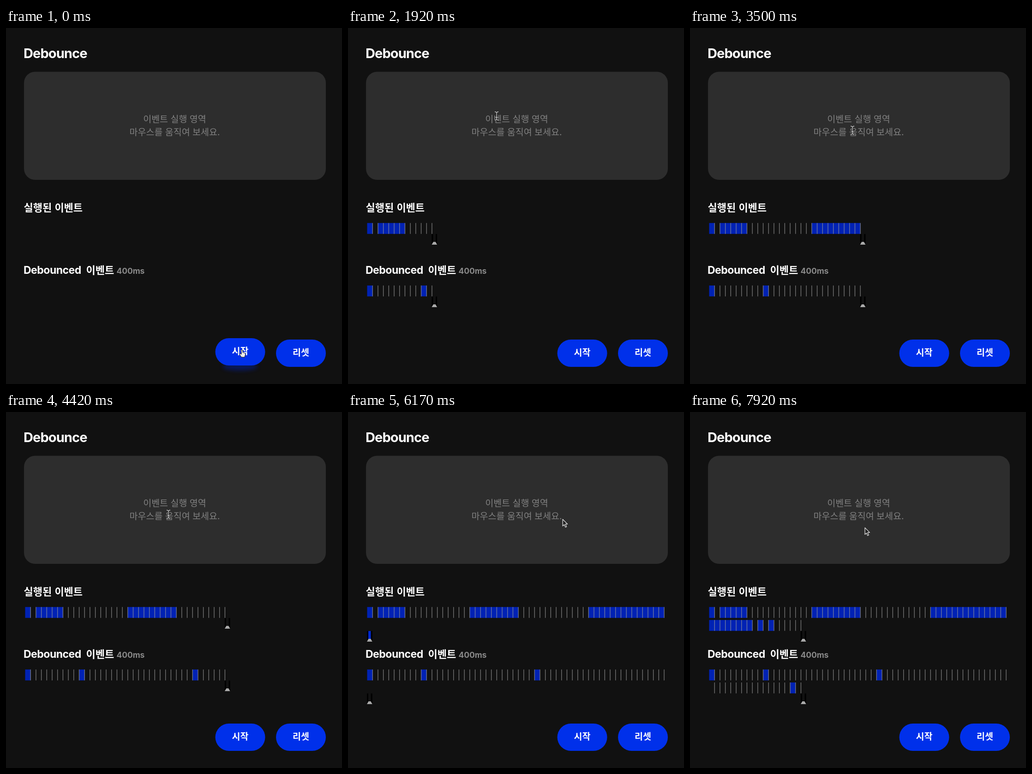
Write an HTML page that moves like this. It is 728x769 px and loops after 8000 ms.

```html
<!DOCTYPE html>
<html lang="ko">
<head>
<meta charset="utf-8">
<title>Debounce</title>
<style>
  html, body { margin: 0; width: 100%; height: 100%; overflow: hidden; background: #111; }
  svg { display: block; width: 728px; height: 769px; }
  text { font-family: Inter, "Noto Sans CJK KR", "Noto Sans CJK", sans-serif; font-weight: 700; fill: #fff; }
  .ko { font-family: "Noto Sans CJK KR", "Noto Sans CJK", sans-serif; font-size: 22px; }
  .hint { font-size: 19.5px; font-weight: 500; fill: #808080; text-anchor: middle; }
  .delay { font-size: 17.5px; letter-spacing: -.1px; fill: #888; }
  .button rect { fill: #0030ea; }
  .button text { font-size: 19.5px; text-anchor: middle; }
  .cells { fill: #0022b4; }
  .lines { fill: none; stroke: #999; stroke-opacity: .78; stroke-width: 1.3; }
</style>
</head>
<body>
<svg viewBox="0 0 728 769">
  <defs>
    <filter id="blur" x="-50%" y="-100%" width="200%" height="300%"><feGaussianBlur stdDeviation="4"/></filter>
    <path id="beamShape" d="M-4-9Q0-9 0-6Q0-9 4-9M0-6V6M-4 9Q0 9 0 6Q0 9 4 9M-2 3H2" fill="none"/>
  </defs>
  <rect width="728" height="769" fill="#111"/>
  <text x="38" y="65" font-size="29" letter-spacing="-.9">Debounce</text>
  <rect x="39" y="94.5" width="654" height="233.5" rx="24" fill="#2d2d2d"/>
  <text class="ko hint" x="365.5" y="204">이벤트 실행 영역</text>
  <text class="ko hint" x="365.5" y="232">마우스를 움직여 보세요.</text>

  <text class="ko" x="38.5" y="396">실행된 이벤트</text>
  <text x="38" y="531" font-size="23" letter-spacing="-.5">Debounced</text>
  <text class="ko" x="173.5" y="531">이벤트</text>
  <text class="delay" x="239.5" y="531">400ms</text>

  <g id="tracks"></g>

  <ellipse id="shadow" cx="507" cy="732" rx="38" ry="8" fill="#0020b0" filter="url(#blur)"/>
  <g class="button" id="start">
    <rect x="453.5" y="673" width="108" height="59" rx="29.5"/>
    <text class="ko" x="507.5" y="708">시작</text>
  </g>
  <g class="button">
    <rect x="585" y="673" width="108" height="59" rx="29.5"/>
    <text class="ko" x="639" y="708">리셋</text>
  </g>

  <g id="pointer" stroke-linejoin="round">
    <path id="arrow" d="M0 0V14.5L3.4 11.4L5.8 17L8.3 16L5.9 10.4H10.4Z" fill="#222" stroke="#ddd" stroke-width="1.3"/>
    <g id="beam">
      <use href="#beamShape" stroke="#222" stroke-width="3"/>
      <use href="#beamShape" stroke="#ccc" stroke-width="1.3"/>
    </g>
    <path id="hand" d="M-2-7Q-.5-8.5 1-7V-2L5-1Q7 0 6.5 3L5 8H-2L-6 2Q-6 0-4 .5L-2 2Z" fill="#eee" stroke="#222"/>
  </g>
</svg>
<script>
const LOOP = 8000, FRAME = 1000 / 12;
const TICK = 100, TICK_START = 655, DELAY_TICKS = 4;
const PITCH = 11.7, LEFT = 41.5, COLUMNS = 55, CELL_HEIGHT = 23.5, ROW_HEIGHT = 28;
const el = id => document.getElementById(id);
const clamp01 = v => Math.min(1, Math.max(0, v));

// Ticks with events: the click, three bursts of movement, two last nudges.
const bursts = [[0, 0], [2, 6], [19, 27], [41, 62], [64, 64], [66, 66]];
const fired = i => bursts.some(([first, last]) => i >= first && i <= last);

// Fires at the click, then once events have paused for the whole delay.
function debounced(i) {
  if (i === 0) return true;
  for (let k = 0; k < DELAY_TICKS; k++) if (fired(i - k)) return false;
  return fired(i - DELAY_TICKS);
}

// Each move glides to a resting point while swirling around the glide.
const buttonSpot = { x: 512, y: 703 };
const moves = [
  { from: 660, to: 1340, x: 322, y: 190, radius: 36, turns: 1, phase: 1.65 },
  { from: 2500, to: 3410, x: 352, y: 221, radius: 64, turns: 1.5, phase: 1.28 },
  { from: 4720, to: 6850, x: 379, y: 250, radius: 105, turns: -2.5, phase: 4.19 }
];

function pointerAt(t) {
  let { x, y } = buttonSpot;
  for (const move of moves) {
    const p = clamp01((t - move.from) / (move.to - move.from));
    const glide = 1 - (1 - p) ** 3;
    const swirl = move.radius * Math.sin(Math.PI * p);
    const angle = 2 * Math.PI * move.turns * p + move.phase;
    x += (move.x - x) * glide + swirl * Math.cos(angle);
    y += (move.y - y) * glide + swirl * Math.sin(angle);
    if (p < 1) break;
  }
  return [x, y];
}

function drawPointer(t) {
  const [x, y] = pointerAt(t);
  const within = (l, r, top, bottom) => x > l && x < r && y > top && y < bottom;
  const shape = within(454, 561, 670, 732) ? "hand"
    : within(298, 433, 186, 207) || within(268, 462, 214, 238) ? "beam" : "arrow";
  for (const id of ["arrow", "beam", "hand"]) el(id).style.display = id === shape ? "" : "none";
  el("pointer").setAttribute("transform", `translate(${x} ${y})`);
}

function makeTrack(top, isOn) {
  el("tracks").insertAdjacentHTML("beforeend",
    `<path class="cells"/><path class="lines"/>
     <g><rect x="3" width="5.7" height="18"/>
     <path d="M0 0h3v17L0 23zM8.7 0h3v23l-3-6z" fill="#000"/>
     <path d="M3.4 17H8.3L11.7 23H0Z" fill="#aaa"/></g>`);
  const [cells, lines, head] = [...el("tracks").children].slice(-3);
  const place = i => [LEFT + i % COLUMNS * PITCH, top + Math.floor(i / COLUMNS) * ROW_HEIGHT];

  return tick => {
    let blue = "", strokes = "";
    for (let i = 0; i < tick; i++) {
      const [x, y] = place(i);
      if (isOn(i)) blue += `M${x} ${y}h${PITCH}v${CELL_HEIGHT}h${-PITCH}z`;
      strokes += `M${x + PITCH} ${y}v${CELL_HEIGHT}`;
    }
    cells.setAttribute("d", blue);
    lines.setAttribute("d", strokes);
    const [x, y] = place(Math.max(0, tick));
    head.style.display = tick < 0 ? "none" : "";
    head.setAttribute("transform", `translate(${x - .5} ${y + CELL_HEIGHT + .3})`);
    head.firstElementChild.setAttribute("fill", isOn(tick) ? "#0028d0" : "#111");
  };
}
const tracks = [makeTrack(421.3, fired), makeTrack(556.3, debounced)];

function draw(now) {
  const t = Math.floor((now % LOOP + 5) / FRAME) * FRAME % LOOP;
  const tick = Math.floor((t - TICK_START) / TICK);
  tracks.forEach(drawTrack => drawTrack(tick));
  const hover = (1 - clamp01((t - 660) / 250)) ** 2;
  el("start").setAttribute("transform", `translate(0 ${-3 * hover})`);
  el("shadow").setAttribute("opacity", hover * .45);
  drawPointer(t);
}

let began;
function loop(now) {
  began ??= now;
  draw(now - began);
  requestAnimationFrame(loop);
}
draw(0);
requestAnimationFrame(loop);
</script>
</body>
</html>
```
